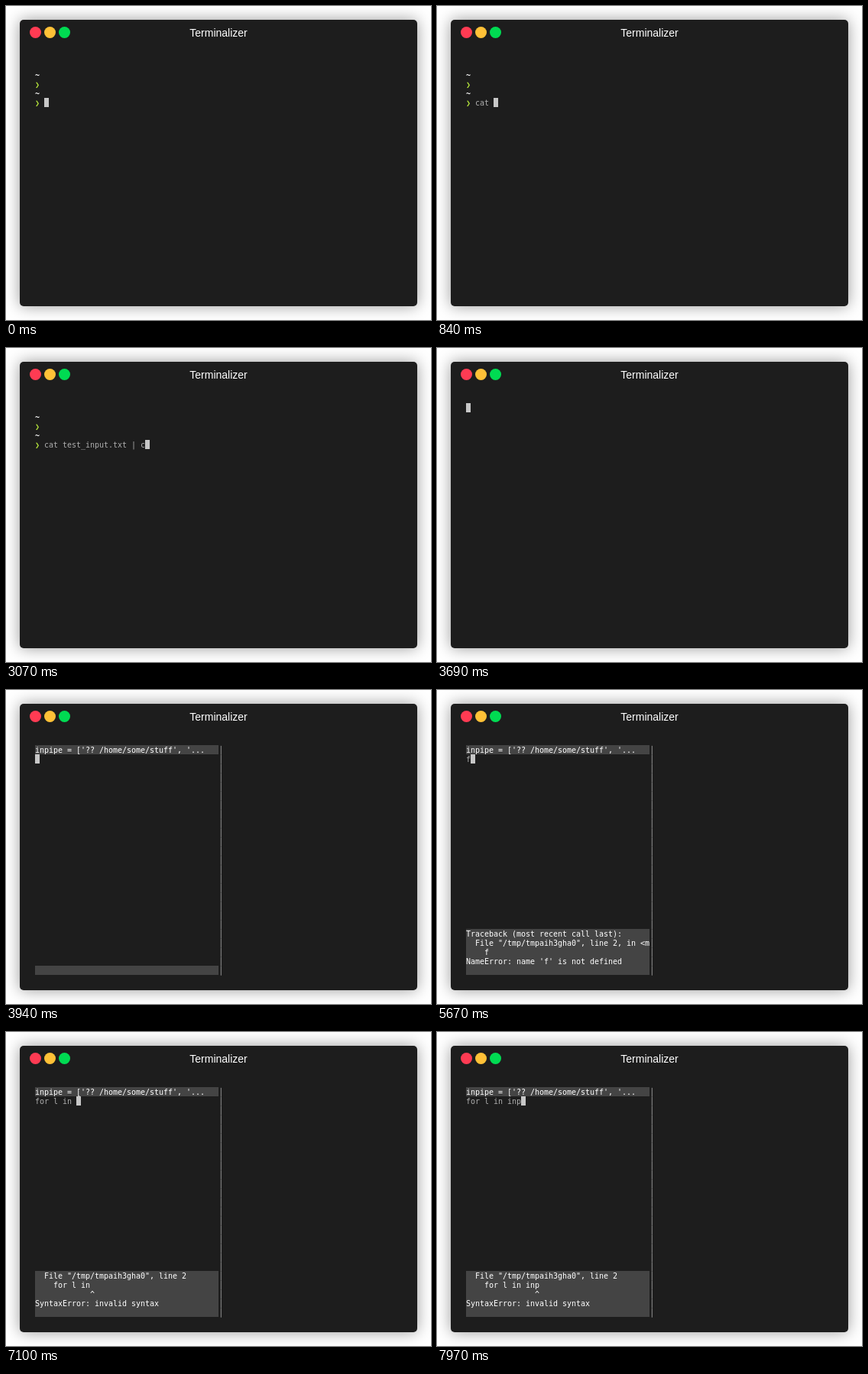
An HTML page with a canvas that plays this animation: 556 by 410 pixels, repeating every 8 s.

```html
<!DOCTYPE html>
<html lang="en">
<head>
<meta charset="utf-8">
<title>Terminalizer</title>
<style>
  html, body { margin: 0; width: 100%; height: 100%; overflow: hidden; background: #fff; }
  canvas { display: block; }
</style>
</head>
<body>
<canvas id="stage" width="556" height="410"></canvas>
<script>
const ctx = document.getElementById('stage').getContext('2d');
const LOOP = 8000, LEFT = 38, TOP = 72, CW = 6, CH = 12, ROWS = 25, PANE = 40;
const MONO = '"DejaVu Sans Mono", monospace';
const BG = '#1d1d1d', FG = '#afafaf', WHITE = '#fff', BAR = '#444', CURSOR = '#c7c7c7', GREEN = '#b3e33b';

// [time, text after that keystroke]
const shell = [
  [0, ''], [500, 'c'], [590, 'ca'], [690, 'cat'], [840, 'cat '],
  [1040, 'cat t'], [1110, 'cat te'], [1260, 'cat tes'], [1370, 'cat test'],
  [1480, 'cat test_input.txt '], [2530, 'cat test_input.txt |'],
  [2820, 'cat test_input.txt | '], [3070, 'cat test_input.txt | c'],
  [3150, 'cat test_input.txt | co'], [3220, 'cat test_input.txt | cod']
];
const CLEAR = 3690, OPEN = 3940;
const editor = [
  [OPEN, ''], [5670, 'f'], [6090, 'fo'], [6160, 'for'], [6320, 'for '],
  [6500, 'for l'], [6670, 'for l '], [6860, 'for l i'], [6940, 'for l in'],
  [7100, 'for l in '], [7810, 'for l in in'], [7970, 'for l in inp']
];

const textAt = (keys, t) => keys.filter(k => k[0] <= t).pop()[1];

function cells(col, row, cols, rows, color) {
  ctx.fillStyle = color;
  ctx.fillRect(LEFT + col * CW, TOP + row * CH, cols * CW, rows * CH);
}

function print(text, col, row, color, bold) {
  ctx.font = (bold ? 'bold ' : '') + '10px ' + MONO;
  ctx.fillStyle = color;
  [...text].forEach((ch, i) => {
    if (ch !== ' ') ctx.fillText(ch, LEFT + (col + i) * CW, TOP + row * CH + 10);
  });
}

function drawWindow() {
  ctx.fillStyle = '#fff';
  ctx.fillRect(0, 0, 556, 410);
  ctx.save();
  ctx.shadowColor = 'rgba(0, 0, 0, .4)';
  ctx.shadowBlur = 20;
  ctx.fillStyle = BG;
  ctx.beginPath();
  ctx.roundRect(18, 18, 520, 374, 5);
  ctx.fill();
  ctx.restore();
  ['#ff3b53', '#ffc137', '#00db52'].forEach((color, i) => {
    ctx.fillStyle = color;
    ctx.beginPath();
    ctx.arc(38.5 + i * 19, 34.5, 7.5, 0, Math.PI * 2);
    ctx.fill();
  });
  ctx.font = '14px "Liberation Sans", Arial, sans-serif';
  ctx.fillStyle = WHITE;
  ctx.textAlign = 'center';
  ctx.fillText('Terminalizer', 278, 40);
  ctx.textAlign = 'left';
}

function drawShell(text) {
  for (const row of [1, 3]) {
    print('~', 0, row, WHITE, true);
    print('❯', 0, row + 1, GREEN, true);
  }
  print(text, 2, 4, FG);
  cells(2 + text.length, 4, 1, 1, CURSOR);
}

function report(code) {
  const file = '  File "/tmp/tmpaih3gha0", line 2';
  if (!code) return [];
  if (code.length < 3) {
    return ['Traceback (most recent call last):', file + ', in <module>',
      '    ' + code, `NameError: name '${code}' is not defined`];
  }
  return [file, '    ' + code, ' '.repeat(code.length + 3) + '^', 'SyntaxError: invalid syntax'];
}

function drawEditor(code) {
  const lines = report(code), first = ROWS - 1 - lines.length;
  cells(0, 0, PANE, 1, BAR);
  print("inpipe = ['?? /home/some/stuff', '...", 0, 0, WHITE);
  print(code, 0, 1, FG);
  cells(code.length, 1, 1, 1, CURSOR);
  cells(0, first, PANE, lines.length + 1, BAR);
  lines.forEach((line, i) => print(line.slice(0, PANE), 0, first + i, WHITE));
  for (let row = 0; row < ROWS; row++) print('│', PANE, row, FG);
}

function frame(now) {
  const t = now % LOOP;
  drawWindow();
  if (t < CLEAR) drawShell(textAt(shell, t));
  else if (t < OPEN) cells(0, 0, 1, 1, CURSOR);
  else drawEditor(textAt(editor, t));
}

const start = performance.now();
function tick() {
  frame(performance.now() - start);
  requestAnimationFrame(tick);
}
tick();
</script>
</body>
</html>
```
